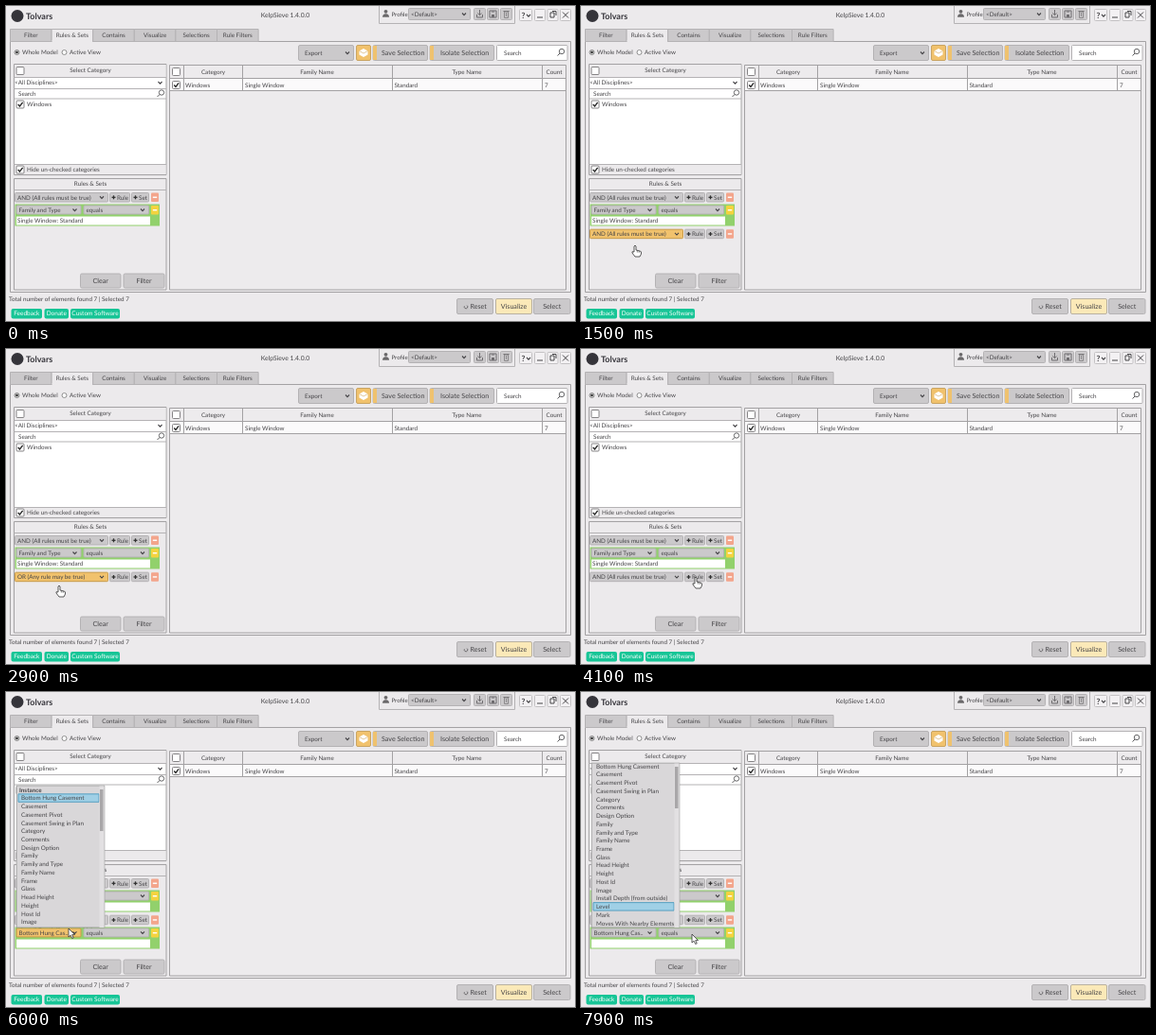
Animation of 600x333 px, one loop 8000 ms. Source, as an HTML page with a canvas:

```html
<!DOCTYPE html>
<html lang="en">
<head>
<meta charset="utf-8">
<style>
html, body { margin: 0; width: 100%; height: 100%; overflow: hidden; background: #eceaec; }
canvas { display: block; }
</style>
</head>
<body>
<canvas id="stage" width="600" height="333"></canvas>
<script>
const ctx = document.getElementById('stage').getContext('2d');
ctx.textRendering = 'geometricPrecision';
const LOOP = 8000, ROW = 8.73;
const INK = '#454447', GREY = '#cbc9cb', EDGE = '#b4b2b4', RULE = '#a3a1a3', PANEL = '#eceaec', ORANGE = '#f1c26d';
const PARAMS = ['Instance', 'Bottom Hung Casement', 'Casement', 'Casement Pivot', 'Casement Swing in Plan',
  'Category', 'Comments', 'Design Option', 'Family', 'Family and Type', 'Family Name', 'Frame', 'Glass',
  'Head Height', 'Height', 'Host Id', 'Image', 'Install Depth (from outside)', 'Level', 'Mark',
  'Moves With Nearby Elements'];
const AND = 'AND (All rules must be true)', OR = 'OR (Any rule may be true)';

// Pointer tip: time, x, y
const PATH = [[100, 84, 220], [300, 110, 212], [500, 141, 203], [700, 141, 203], [1000, 60, 242], [1200, 58, 244],
  [1400, 57, 253], [2000, 57, 253], [2200, 57, 244], [2500, 56, 244], [2800, 56, 250], [3000, 56, 250],
  [3700, 121, 241], [4400, 121, 241], [5200, 71, 253], [5500, 71, 253], [5700, 66, 250], [6400, 66, 250],
  [6900, 52, 232], [7200, 50, 226], [7500, 50, 226], [7900, 117, 256]];

function pointerAt(t) {
  const i = PATH.findIndex(p => p[0] >= t);
  if (i < 1) return PATH[0].slice(1);
  const [t0, x0, y0] = PATH[i - 1], [t1, x1, y1] = PATH[i];
  const k = (t - t0) / (t1 - t0), e = k * k * (3 - 2 * k);
  return [x0 + (x1 - x0) * e, y0 + (y1 - y0) * e];
}

function box(x, y, r, b, fill, edge, radius = 0) {
  ctx.beginPath();
  ctx.roundRect(x, y, r - x, b - y, radius);
  if (fill) { ctx.fillStyle = fill; ctx.fill(); }
  if (edge) { ctx.strokeStyle = edge; ctx.lineWidth = 1; ctx.stroke(); }
}
function line(points, color = INK, width = 1) {
  ctx.beginPath();
  for (let i = 0; i < points.length; i += 2) ctx.lineTo(points[i], points[i + 1]);
  ctx.strokeStyle = color; ctx.lineWidth = width; ctx.stroke();
}
function disc(x, y, r, fill, edge) {
  ctx.beginPath(); ctx.arc(x, y, r, 0, 7);
  if (fill) { ctx.fillStyle = fill; ctx.fill(); }
  if (edge) { ctx.strokeStyle = edge; ctx.lineWidth = .8; ctx.stroke(); }
}
function text(s, x, y, { size = 6.3, align = 'left', color = INK, weight = 400 } = {}) {
  ctx.font = `${weight} ${size}px Lato, sans-serif`;
  ctx.textAlign = align; ctx.fillStyle = color;
  ctx.fillText(s, x, y + size * .36);
}
const label = (s, x, y, size) => text(s, x, y, { size, align: 'center' });
const chevron = (x, y) => line([x - 2, y - 1, x, y + 1.1, x + 2, y - 1], INK, 1.1);

function combo(x, y, r, b, s, hot) {
  box(x, y, r, b, hot ? ORANGE : GREY, hot ? '#c89a48' : EDGE, 1);
  text(s, x + 2.5, (y + b) / 2);
  chevron(r - 6.5, (y + b) / 2);
}
function button(x, y, r, b, s, fill = GREY, edge = EDGE) {
  box(x, y, r, b, fill, edge, 1.5);
  label(s, (x + r) / 2, (y + b) / 2, 7.1);
}
function check(x, y, on) {
  box(x, y, x + 8, y + 8, '#fff', '#858385', 1);
  if (on) line([x + 1.7, y + 4, x + 3.5, y + 6, x + 6.6, y + 1.8], '#222', 1.3);
}
function lens(x, y) {
  disc(x + 1, y - 1, 2.7, null, INK);
  line([x - 1, y + 1, x - 3.5, y + 3.5], INK, .9);
}
function minus(y, b, fill) {
  box(153, y, 161, b, fill, null, 1);
  line([154.8, (y + b) / 2, 159.2, (y + b) / 2], '#fff', 1.4);
}
function plusButton(x, r, y, s) {
  box(x, y, r, y + 9.5, GREY, EDGE, 1);
  const cx = x + 4, cy = y + 4.8;
  line([cx - 2, cy, cx + 2, cy], '#333', 1.3);
  line([cx, cy - 2, cx, cy + 2], '#333', 1.3);
  text(s, x + 7.5, cy);
}

function groupRow(y, s, hot) {
  combo(9.5, y, 107.5, y + 9.5, s, hot);
  plusButton(109.5, 130.5, y, 'Rule');
  plusButton(132.5, 150.5, y, 'Set');
  minus(y, y + 9.5, '#f3a58c');
}
function ruleCard(y, param, value, hot) {
  box(9.5, y, 162, y + 23, '#92d16c');
  combo(11, y + 1.5, 79, y + 10.5, param, hot);
  combo(82, y + 1.5, 150.5, y + 10.5, 'equals');
  minus(y + 1.5, y + 11, '#f4d33f');
  box(11, y + 13, 152, y + 22, '#fff');
  text(value, 12, y + 17.4);
}

function header() {
  disc(12, 10.5, 6.5, '#35343a');
  text('Tolvars', 21, 10.5, { size: 9, weight: 700, color: '#35343a' });
  label('KelpSieve 1.4.0.0', 294.5, 10, 6.8);
  box(393.5, -1, 536.5, 18.5, PANEL, EDGE);
  disc(400.5, 5.8, 1.9, '#6a686a');
  ctx.beginPath(); ctx.arc(400.5, 11.8, 3.5, Math.PI, 0); ctx.fill();
  text('Profile', 406.5, 8.5, { size: 6.1 });
  combo(424.5, 2.5, 489.5, 14.5, '<Default>');
  for (const x of [493.5, 507.5, 521.5]) box(x, 2.5, x + 12, 14.5, GREY, EDGE, 1);
  const icon = '#6f6d70';
  line([499.5, 4, 499.5, 9.5], icon); line([497.3, 7.5, 499.5, 9.7, 501.7, 7.5], icon);
  line([496.5, 9, 496.5, 12, 502.5, 12, 502.5, 9], icon);
  box(510, 5, 517, 12, null, icon); box(512, 9, 515, 12, icon); line([512, 6, 515, 6], icon);
  line([524.5, 5.5, 530.5, 5.5], icon); box(525.5, 6, 529.5, 12.5, null, '#8a888a'); line([527.5, 7, 527.5, 11], '#8a888a');
  for (const [x, r] of [[541.5, 554.5], [557.5, 568.5], [571, 582], [584.5, 595.5]])
    box(x, 3.5, r, 15.5, '#f3f1f3', '#c4c2c4', 1);
  text('?', 543.5, 9.5, { size: 8.5, weight: 700 }); chevron(551, 10);
  line([560, 12, 566, 12]); box(574, 7, 578, 12, null, INK); line([576, 5.5, 580, 5.5, 580, 10]);
  line([587, 6.5, 593, 12.5]); line([593, 6.5, 587, 12.5]);

  box(4.5, 37.5, 595.5, 302.5, PANEL, RULE);
  const tabs = ['Filter', 'Rules & Sets', 'Contains', 'Visualize', 'Selections', 'Rule Filters'];
  tabs.forEach((s, i) => {
    const x = 4.5 + i * 43.6, on = i === 1;
    box(x, 24.5, x + 43.6, 37.5, on ? PANEL : GREY, EDGE);
    if (on) box(x + .5, 36, x + 43, 39, PANEL);
    label(s, x + 21.8, 30.5);
  });
}

function toolbar() {
  disc(11.5, 49, 2.5, '#fff', '#666'); disc(11.5, 49, 1.4, '#333');
  text('Whole Model', 17, 49);
  disc(61.5, 49, 2.5, '#fff', '#777');
  text('Active View', 67, 49);
  box(308.5, 41.5, 366.5, 57.5, GREY, EDGE, 1.5);
  text('Export', 315, 49.5); chevron(360, 49.5);
  box(369.5, 41.5, 384.5, 57.5, ORANGE, '#c9a462', 1.5);
  ctx.fillStyle = '#fff';
  ctx.beginPath();
  for (const [x, y] of [[377, 45], [381.5, 47.5], [381.5, 51.5], [377, 54], [372.5, 51.5], [372.5, 47.5]]) ctx.lineTo(x, y);
  ctx.fill();
  line([372.5, 47.5, 377, 50, 381.5, 47.5], '#d5b071', .7);
  for (const [x, r, s, tx] of [[387, 444.5, 'Save Selection', 396], [447, 514.5, 'Isolate Selection', 458]]) {
    box(x, 41.5, r, 57.5, GREY, EDGE, 1.5);
    box(x, 42, x + 4, 57, '#efc26f');
    text(s, tx, 49.5, { size: 7.15 });
  }
  box(517.5, 41.5, 592, 57.5, '#fff', EDGE, 1);
  text('Search', 525, 49.5); lens(585, 49);
}

function categories() {
  box(8.5, 61.5, 169, 178.5, '#fff', RULE);
  box(9, 62, 168.5, 75, PANEL);
  check(11, 64.5); label('Select Category', 89, 68);
  line([8.5, 75.5, 169, 75.5], EDGE);
  text('<All Disciplines>', 9, 81); chevron(162.5, 81);
  line([8.5, 87.5, 169, 87.5], EDGE);
  text('Search', 13, 92.7); lens(163, 92.5);
  line([8.5, 98, 169, 98], EDGE);
  check(11, 100, true); text('Windows', 22, 104);
  box(9, 167.5, 168.5, 178, PANEL);
  line([8.5, 167.5, 169, 167.5], EDGE);
  check(11, 169, true); text('Hide un-checked categories', 22, 173);
}

function table() {
  box(172.5, 62.5, 590.5, 300, '#edebed', RULE);
  box(173, 76, 590, 89.5, '#fbfafb');
  line([172.5, 76.5, 590.5, 76.5], RULE); line([172.5, 89.5, 590.5, 89.5], RULE);
  for (const x of [187.5, 249.5, 407.5, 565.5]) line([x, 62, x, 89.5], RULE);
  check(175.5, 65.5); check(175.5, 79.5, true);
  label('Category', 218.5, 69.5); label('Family Name', 328, 69.5);
  label('Type Name', 486, 69.5); label('Count', 578, 69.5);
  text('Windows', 189, 83.5); text('Single Window', 252, 83.5);
  text('Standard', 409.5, 83.5); text('7', 568, 83.5);
}

function footer() {
  text('Total number of elements found 7 | Selected 7', 3, 309.5);
  for (const [x, r, s] of [[5.5, 38, 'Feedback'], [40.5, 66, 'Donate'], [68, 120, 'Custom Software']]) {
    box(x, 320, r, 330.5, '#16c596', null, 2);
    text(s, (x + r) / 2, 325, { align: 'center', color: '#fff', size: 6.5 });
  }
  button(475.5, 309.5, 513.5, 325.5, '');
  text('Reset', 489.5, 317.5, { size: 7.1 });
  ctx.beginPath(); ctx.arc(485, 318, 1.8, -.9, 3.6);
  ctx.strokeStyle = INK; ctx.lineWidth = .7; ctx.stroke();
  button(516.5, 309.5, 554.5, 325.5, 'Visualize', '#fbe9b8', '#b9b1a0');
  button(556.5, 309.5, 595, 325.5, 'Select');
}

function rules(t) {
  box(8.5, 182.5, 169, 300, PANEL, RULE);
  label('Rules & Sets', 89, 188);
  line([8.5, 194.5, 169, 194.5], EDGE);
  groupRow(197.5, AND);
  ruleCard(209.5, 'Family and Type', 'Single Window: Standard');
  if (t >= 700) groupRow(236.2, t >= 1600 && t < 3000 ? OR : AND, t >= 1000 && t < 3200);
  if (t >= 4500) ruleCard(248.4, 'Bottom Hung Cas..', '', t >= 5600 && t < 7600);
  button(78.5, 283, 121, 298, 'Clear');
  button(124, 283, 167, 298, 'Filter');
}

function setPopup(pick) {
  box(9.5, 246, 107.5, 265, '#dad8da', '#999');
  box(10.5, 247 + pick * 9, 106.5, 255.5 + pick * 9, '#a3d3e8', '#5aa3c4');
  text(AND, 12, 251.2); text(OR, 12, 260.2);
}

function paramPopup(t, tipY) {
  const left = Math.max(0, 1 - (t - 5850) / 310);
  const top = 75 + 174 * left ** 3;
  const scroll = 9.7 * Math.min(1, Math.max(0, (t - 6600) / 200));
  const first = top + 4.4 - scroll;
  const hot = t < 6700 ? 1 : t < 7200 ? Math.round((tipY - first) / ROW) : 18;
  ctx.save();
  ctx.beginPath(); ctx.rect(10.5, top - .5, 94, 250 - top); ctx.clip();
  box(11, top, 104, 249, '#d9d7d9', '#999');
  PARAMS.forEach((s, i) => {
    const y = first + i * ROW;
    if (i === hot) box(13, y - 4.2, 98, y + 4.2, '#a0d0e6', '#559fc0');
    text(s, i ? 16 : 14, y, { weight: i ? 400 : 700 });
  });
  box(98.5, top + .5, 103.5, 249, '#e2e0e2');
  box(99, top + 4, 102.5, top + 48, '#a9a7a9');
  ctx.restore();
}

function pointer(x, y, hand) {
  ctx.save();
  ctx.translate(x, y);
  ctx.lineJoin = 'round';
  const shape = new Path2D(hand
    ? 'M-1 1Q0-1 1 1V5L5 6Q7 6 6.5 9L5 12H0L-3 8Q-4 6-1 7Z'
    : 'M0 0V9L2.1 7.2L3.7 10.5L5.2 9.8L3.7 6.6H6.5Z');
  ctx.fillStyle = '#fff'; ctx.fill(shape);
  ctx.strokeStyle = '#333'; ctx.lineWidth = .8; ctx.stroke(shape);
  if (hand) { line([2.3, 5.5, 2.3, 7.5], '#333', .6); line([4.2, 6, 4.2, 7.8], '#333', .6); }
  ctx.restore();
}

function draw(now) {
  const t = Math.floor((now % LOOP) / 100) * 100;
  const [x, y] = pointerAt(t);
  box(0, 0, 600, 333, '#eceaec');
  header(); toolbar(); categories(); table(); footer(); rules(t);
  if (t >= 1200 && t < 1500) setPopup(t < 1400 ? 0 : 1);
  if (t >= 2400 && t < 2900) setPopup(t < 2800 ? 1 : 0);
  if (t >= 5900) paramPopup(t, y);
  if (t >= 100) pointer(x, y, t < 4700);
  requestAnimationFrame(draw);
}
requestAnimationFrame(draw);
</script>
</body>
</html>
```
